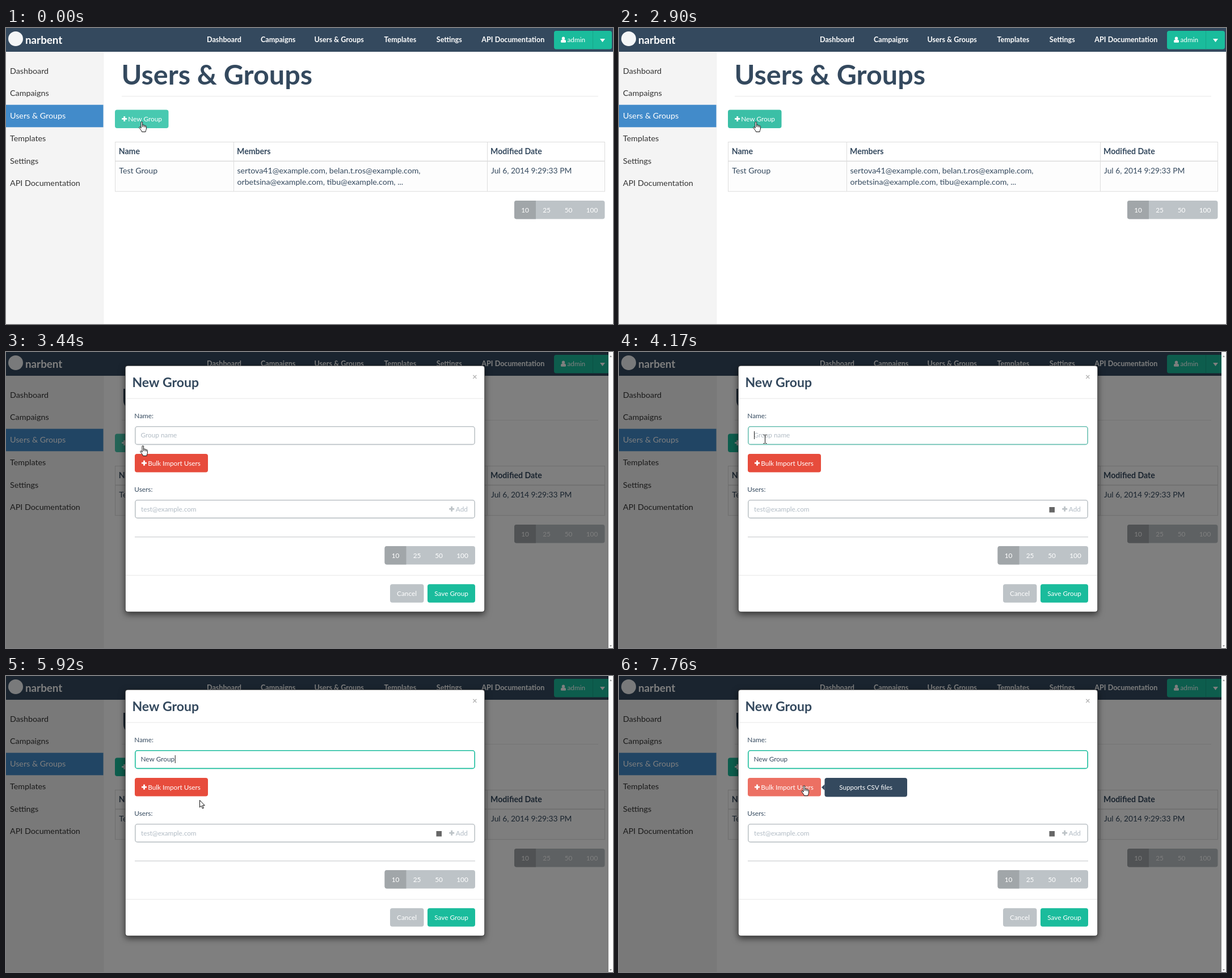
Recreate the animation shown at these times as an HTML page with a canvas. Size 1070 by 523 pixels, loop 8 s.

```html
<!DOCTYPE html>
<html lang="en">
<head>
<meta charset="utf-8">
<title>Users &amp; Groups</title>
<style>
html, body { margin: 0; width: 100%; height: 100%; overflow: hidden; background: #fff; }
canvas { display: block; }
</style>
</head>
<body>
<canvas id="stage" width="1070" height="523"></canvas>
<script>
const ctx = document.getElementById('stage').getContext('2d');
const LOOP = 8000;
const NAVY = '#34495e', GREEN = '#1abc9c', SILVER = '#bdc3c7', HINT = '#b2bcc5', RED = '#e74c3c';
const BODY = 14.15, SMALL = 11.8;

const CURSORS = {
  hand: new Path2D('M4 12V2C4 .2 6.6 .2 6.6 2V7C7 5.8 9 6 9.1 7.4C9.8 6.4 11.3 6.8 11.4 8.2C12 7.4 13.4 7.8 13.4 9.2V13C13.4 15 12 16 12 18.5H5.5C5.5 16.5 2 13.5 1 11.3C.4 9.8 2.2 9 3.2 10.6Z'),
  arrow: new Path2D('M.5 .5V13L3.4 10.4L5.4 15.2L7.4 14.3L5.4 9.7H9.3Z'),
  beam: new Path2D('M.5 .5H2.5L3.5 1.5L4.5 .5H6.5M3.5 1.5V14.5M.5 15.5H2.5L3.5 14.5L4.5 15.5H6.5')
};

// Each track is a list of [start time, value]; values hold until the next start.
const TRACKS = {
  cursor: [
    [0, ['hand', 234, 165]], [500, ['hand', 235, 165]], [660, ['hand', 236, 165]],
    [3610, ['arrow', 242, 165]], [3750, ['arrow', 251, 164]], [4020, ['beam', 254, 146]],
    [4410, ['hand', 290, 190]], [4560, ['arrow', 341, 219]],
    [7120, ['hand', 326, 198]], [7240, ['hand', 321, 193]]
  ],
  newButton: [[0, '#48c9b0'], [2900, '#3bbfa6'], [3320, '#48c9b0'], [3750, GREEN]],
  modalTop: [[0, null], [3320, 5.5], [3440, 24.5]],
  helper: [[0, false], [3750, true]],
  nameBorder: [[0, SILVER], [4170, '#6bc0b2'], [4290, GREEN]],
  typed: [
    [0, ''], [5230, 'Ne'], [5370, 'New '], [5520, 'New G'],
    [5640, 'New Gr'], [5760, 'New Grou'], [5920, 'New Group']
  ],
  caret: [[0, false], [4170, true], [4800, false], [5230, true], [6340, false], [6870, true], [7760, false]],
  importButton: [[0, RED], [7120, '#e95a4b'], [7240, '#ec7063']],
  tooltip: [[0, 0], [4560, 0.13], [4680, 0], [7240, 0.4], [7360, 0.9], [7480, 1]]
};

function valueAt(track, time) {
  let value;
  for (const [start, v] of track) if (time >= start) value = v;
  return value;
}

function text(str, x, y, size, color, { bold = false, align = 'left' } = {}) {
  ctx.font = `${bold ? 700 : 400} ${size}px Lato, sans-serif`;
  ctx.fillStyle = color;
  ctx.textAlign = align;
  ctx.fillText(str, x, y);
}

function rect(x, y, w, h, color) {
  ctx.fillStyle = color;
  ctx.fillRect(x, y, w, h);
}

function rounded(x, y, w, h, color, radii = 4) {
  ctx.beginPath();
  ctx.roundRect(x, y, w, h, radii);
  ctx.fillStyle = color;
  ctx.fill();
}

function triangle(x1, y1, x2, y2, x3, y3, color) {
  ctx.beginPath();
  ctx.moveTo(x1, y1);
  ctx.lineTo(x2, y2);
  ctx.lineTo(x3, y3);
  ctx.fillStyle = color;
  ctx.fill();
}

function plus(cx, cy, color) {
  rect(cx - 4.5, cy - 1.4, 9, 2.8, color);
  rect(cx - 1.4, cy - 4.5, 2.8, 9, color);
}

function pager(x, y) {
  rounded(x, y, 159.5, 32.5, SILVER);
  rounded(x, y, 38, 32.5, '#a1a6a9', [4, 0, 0, 4]);
  [['10', 19], ['25', 57], ['50', 95.5], ['100', 137]].forEach(([label, dx]) =>
    text(label, x + dx, y + 20.5, SMALL, '#fff', { align: 'center' }));
}

function input(y, border) {
  ctx.beginPath();
  ctx.roundRect(227.8, y + 0.8, 598.4, 31.6, 4);
  ctx.fillStyle = '#fff';
  ctx.fill();
  ctx.strokeStyle = border;
  ctx.lineWidth = 1.6;
  ctx.stroke();
}

function drawNavbar() {
  rect(0, 0, 1070, 42, NAVY);
  ctx.beginPath();
  ctx.arc(17, 19, 13, 0, Math.PI * 2);
  ctx.fillStyle = '#f4f6f7';
  ctx.fill();
  text('narbent', 34, 27.5, 18.8, '#fff', { bold: true });
  [['Dashboard', 354], ['Campaigns', 449], ['Users & Groups', 543.5], ['Templates', 666.5],
   ['Settings', 758.8], ['API Documentation', 838.3]].forEach(([label, x]) =>
    text(label, x, 25, 12.6, '#fff', { bold: true }));

  rounded(966, 5, 102, 32.5, GREEN);
  rect(1034, 5, 1, 32.5, '#17a589');
  ctx.beginPath();
  ctx.arc(982.5, 18.3, 2.7, 0, Math.PI * 2);
  ctx.fillStyle = '#fff';
  ctx.fill();
  rounded(978, 20.5, 9, 5.2, '#fff', [3, 3, 1.5, 1.5]);
  text('admin', 989.5, 25, SMALL, '#fff');
  triangle(1047, 19, 1056, 19, 1051.5, 25, '#fff');
}

function drawSidebar() {
  rect(0, 42, 171.5, 481, '#f4f4f4');
  rect(171.5, 42, 0.8, 481, '#eee');
  rect(0, 135.7, 171.5, 39.6, '#428bca');
  ['Dashboard', 'Campaigns', 'Users & Groups', 'Templates', 'Settings', 'API Documentation']
    .forEach((label, i) => text(label, 7, 80.7 + i * 39.7, 14.3, i === 2 ? '#fff' : '#333'));
}

function drawTable() {
  rect(192, 236, 864, 53, '#fdfdfd');
  const line = '#ddd';
  rect(192, 201, 864, 1, line);
  rect(192, 234.5, 864, 1.6, line);
  rect(192, 288.3, 864, 1, line);
  [192, 401, 848, 1055].forEach(x => rect(x, 201, 1, 88, line));

  [['Name', 198.7], ['Members', 407], ['Modified Date', 854]].forEach(([label, x]) =>
    text(label, x, 223, BODY, NAVY, { bold: true }));
  text('Test Group', 199.3, 257, BODY, NAVY);
  text('sertova41@example.com, belan.t.ros@example.com,', 407.5, 257, BODY, NAVY);
  text('orbetsina@example.com, tibu@example.com, ...', 407.5, 277, BODY, NAVY);
  text('Jul 6, 2014 9:29:33 PM', 855, 257, 13.85, NAVY);
}

function drawPage(time) {
  rect(0, 0, 1070, 523, '#fff');
  drawSidebar();
  drawNavbar();
  text('Users & Groups', 203.5, 99.7, 48.5, NAVY, { bold: true });
  rect(204, 120, 840, 1, '#e9e9e9');
  rounded(192, 144.5, 94.5, 32.5, valueAt(TRACKS.newButton, time));
  plus(208.7, 160.5, '#fff');
  text('New Group', 215.2, 165, SMALL, '#fff');
  drawTable();
  pager(896, 305);
}

function drawBackdrop() {
  rect(0, 0, 1062, 523, 'rgba(0,0,0,0.5)');
  rect(1062, 0, 8, 523, '#fcfcfc');
  triangle(1064, 9, 1068, 9, 1066, 6, '#999');
  triangle(1064, 518, 1068, 518, 1066, 521, '#999');
}

function drawTooltip(alpha) {
  ctx.globalAlpha = alpha;
  rounded(362.5, 180, 145.5, 33.5, NAVY);
  triangle(357, 196.7, 362.5, 191.5, 362.5, 202, NAVY);
  text('Supports CSV files', 435.2, 201, 11.6, '#fff', { align: 'center' });
  ctx.globalAlpha = 1;
}

function drawNameField(time) {
  input(131, valueAt(TRACKS.nameBorder, time));
  const typed = valueAt(TRACKS.typed, time);
  text(typed || 'Group name', 237.5, 151.3, SMALL, typed ? NAVY : HINT);
  if (valueAt(TRACKS.caret, time)) {
    rect(238 + (typed ? ctx.measureText(typed).width : 0), 140, 1, 14, '#222');
  }
}

// Laid out at its resting position; sliding only shifts the origin.
function drawModal(time, top) {
  ctx.save();
  ctx.translate(0, top - 24.5);

  ctx.save();
  ctx.shadowColor = 'rgba(0,0,0,0.6)';
  ctx.shadowBlur = 12;
  ctx.shadowOffsetY = 4;
  rounded(210, 24, 634, 435.5, '#444');
  ctx.restore();
  rounded(210.8, 24.8, 632.4, 434, '#fff', 4);

  text('New Group', 222.5, 61.5, 23, NAVY, { bold: true });
  text('×', 826.3, 49, 15, '#b5b5b5', { bold: true, align: 'center' });
  rect(211, 81.7, 632, 1, '#e8e8e8');

  text('Name:', 226.3, 116.8, SMALL, NAVY);
  drawNameField(time);

  rounded(227, 180, 129, 32.5, valueAt(TRACKS.importButton, time));
  plus(243.5, 196.2, '#fff');
  text('Bulk Import Users', 250.2, 200.7, SMALL, '#fff');
  drawTooltip(valueAt(TRACKS.tooltip, time));

  text('Users:', 226.3, 246.7, SMALL, NAVY);
  input(261, SILVER);
  text('test@example.com', 238, 281.5, SMALL, HINT);
  if (valueAt(TRACKS.helper, time)) rect(758.5, 274, 9.5, 9.5, '#666');
  plus(785.7, 277.3, SILVER);
  text('Add', 792.8, 281.5, SMALL, HINT);

  rect(227, 326, 600, 1.5, '#d5d8da');
  pager(667.5, 343);
  rect(211, 394, 632, 1, '#e8e8e8');
  rounded(677, 410.3, 59.5, 32.5, SILVER);
  text('Cancel', 706.5, 430.8, SMALL, '#fff', { align: 'center' });
  rounded(743, 410.3, 84, 32.5, GREEN);
  text('Save Group', 785, 430.8, SMALL, '#fff', { align: 'center' });
  ctx.restore();
}

function drawCursor([kind, x, y]) {
  const shape = CURSORS[kind];
  ctx.save();
  ctx.translate(x, y);
  if (kind !== 'beam') {
    ctx.fillStyle = '#fff';
    ctx.fill(shape);
  }
  ctx.strokeStyle = '#111';
  ctx.lineWidth = 1;
  ctx.stroke(shape);
  if (kind === 'hand') ctx.stroke(new Path2D('M6.6 7V10M9.1 7.5V10.3M11.4 8.3V10.6'));
  ctx.restore();
}

function render(now) {
  const time = now % LOOP;
  drawPage(time);
  const top = valueAt(TRACKS.modalTop, time);
  if (top !== null) {
    drawBackdrop();
    drawModal(time, top);
  }
  drawCursor(valueAt(TRACKS.cursor, time));
}

const begin = performance.now();
function tick() {
  render(performance.now() - begin);
  requestAnimationFrame(tick);
}
tick();
</script>
</body>
</html>
```
